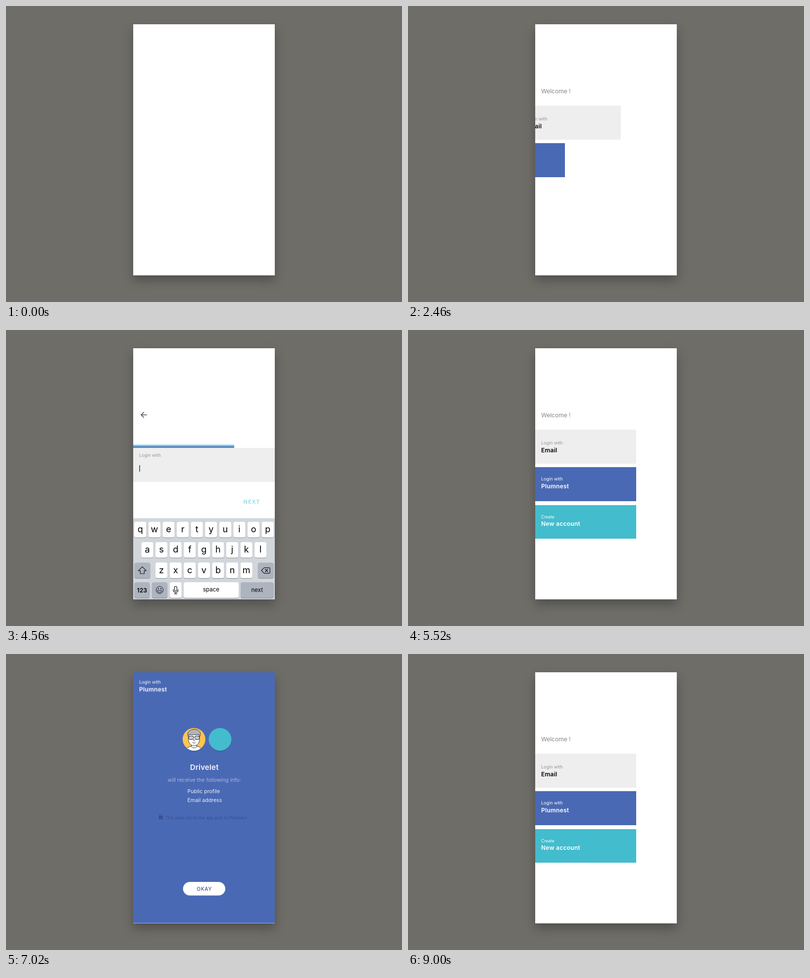
An HTML page that plays this animation: 800x600 px, repeating every 9.03 s.

```html
<!DOCTYPE html>
<html lang="en">
<head>
<meta charset="utf-8">
<title>Login flow</title>
<style>
  html, body { margin: 0; width: 100%; height: 100%; overflow: hidden; background: #6e6d68; }
  body { position: relative; font-family: Inter, Roboto, sans-serif; }

  .phone {
    position: absolute; left: 257px; top: 37px; width: 286px; height: 509px;
    background: #fff; box-shadow: 0 10px 20px rgba(0, 0, 0, .28);
  }
  .screen, .layer { position: absolute; left: 0; top: 0; width: 286px; height: 509px; overflow: hidden; }
  .layer { z-index: 6; }
  svg text { font-family: Inter, Roboto, sans-serif; }

  .anim, .card, .card div, .card b, .card span {
    animation: 9030ms cubic-bezier(.4, 0, .2, 1) infinite both;
  }

  .card { position: absolute; left: 0; width: 204px; height: 68.6px; overflow: hidden; color: #fff; }
  .card div { position: absolute; left: 12px; top: 0; white-space: nowrap; }
  .card span, .card b { position: absolute; left: 0; line-height: 16px; }
  .card span { top: 16.2px; font-size: 9px; }
  .card b { top: 31.2px; font-size: 12px; font-weight: 600; letter-spacing: .25px; }

  .email { top: 165px; background: #eee; color: #000; animation-name: email, widen; z-index: 3; }
  .email span { top: 18.5px; color: #969696; animation-name: labelUp; }
  .email b { top: 33.5px; animation-name: nameOut; }
  .social { top: 241.3px; background: #4a69b5; animation-name: social; }
  .social div { animation-name: socialText; }
  .create { top: 317.6px; background: #43bccd; animation-name: create; z-index: 1; }
  .create span { font-size: 8.5px; }
  .create b { top: 30.6px; }
  .caret {
    position: absolute; left: 12px; top: 35px; width: 1.6px; height: 13px;
    background: #3f6cc0; animation-name: caret;
  }

  .logo { transform-box: fill-box; transform-origin: center; animation-name: logo; }
  .ripple { transform-box: fill-box; transform-origin: center; animation-name: ripple; }
  .welcome { animation-name: welcome; }
  .back { animation-name: back; }
  .next { animation-name: next; }
  .keys { animation-name: keys; }
  .page { animation-name: page; }
  .rise { animation-name: rise; animation-delay: var(--d, 0ms); }

  @keyframes logo {
    0%, 5.98% { transform: scale(0); animation-timing-function: cubic-bezier(.2, 0, 0, 1); }
    13.953%, 16.611% { transform: scale(1); }
    20.93%, 100% { transform: scale(0); }
  }
  @keyframes welcome {
    0%, 24.585% { opacity: 0; }
    26.578%, 37.98% { opacity: 1; }
    39.867%, 54.26% { opacity: 0; }
    57.586%, 61.57% { opacity: 1; }
    63.68%, 91.36% { opacity: 0; }
    94.13%, 100% { opacity: 1; }
  }
  @keyframes email {
    0%, 24.585% { transform: translate(-205px, 0); animation-timing-function: cubic-bezier(.15, 0, 0, 1); }
    30.532%, 36.955% { transform: translate(0, 0); }
    41.384%, 53.156% { transform: translate(0, 37px); }
    57.586%, 61.24% { transform: translate(0, 0); }
    65.67%, 90.033% { transform: translate(0, 76.3px); }
    95.238%, 100% { transform: translate(0, 0); }
  }
  @keyframes widen {
    0%, 39.867% { width: 204px; }
    44.297%, 51.495% { width: 286px; }
    55.925%, 100% { width: 204px; }
  }
  @keyframes labelUp {
    0%, 39.867% { transform: translateY(0); }
    44.297%, 51.495% { transform: translateY(-12.4px); }
    55.925%, 100% { transform: translateY(0); }
  }
  @keyframes nameOut {
    0%, 39.867% { opacity: 1; }
    42.303%, 53.156% { opacity: 0; }
    56.5%, 100% { opacity: 1; }
  }
  @keyframes caret {
    0%, 46.844% { opacity: 0; }
    48.173%, 50.498% { opacity: 1; }
    51.495%, 100% { opacity: 0; }
  }
  @keyframes social {
    0%, 26.578% {
      transform: translate(-205px, 0); width: 204px; height: 68.6px; opacity: 1; z-index: 2;
      animation-timing-function: cubic-bezier(.15, 0, 0, 1);
    }
    32.525%, 37.874% { transform: translate(0, 0); width: 204px; height: 68.6px; opacity: 1; z-index: 2; }
    42.303% { transform: translate(0, -42.8px); opacity: 1; z-index: 2; }
    44.297%, 51.495% { transform: translate(0, -42.8px); opacity: .7; z-index: 2; }
    53.156% { transform: translate(0, -42.8px); opacity: 1; z-index: 2; }
    57.586% { transform: translate(0, 0); z-index: 2; }
    61.24%, 64.23% { transform: translate(0, 0); width: 204px; height: 68.6px; z-index: 5; }
    70.764%, 83.056% { transform: translate(0, -241.3px); width: 286px; height: 509px; z-index: 5; }
    90.033%, 95.238% { transform: translate(0, 0); width: 204px; height: 68.6px; z-index: 5; }
    100% { transform: translate(0, 0); width: 204px; height: 68.6px; opacity: 1; z-index: 2; }
  }
  @keyframes socialText {
    0%, 64.23% { transform: translateY(0); }
    70.764%, 83.056% { transform: translateY(-3.7px); }
    90.033%, 100% { transform: translateY(0); }
  }
  @keyframes create {
    0%, 28.571% {
      transform: translate(-205px, 0); opacity: 1;
      animation-timing-function: cubic-bezier(.15, 0, 0, 1);
    }
    34.518%, 36.877% { transform: translate(0, 0); opacity: 1; }
    41.307% { transform: translate(0, -122.6px); opacity: 1; }
    44.297%, 51.495% { transform: translate(0, -122.6px); opacity: .65; }
    53.156% { transform: translate(0, -122.6px); opacity: 1; }
    58.7%, 61.24% { transform: translate(0, 0); opacity: 1; }
    65.67%, 90.033% { transform: translate(0, -76.3px); }
    95.238%, 100% { transform: translate(0, 0); opacity: 1; }
  }
  @keyframes back {
    0%, 39.867% { opacity: 0; }
    42.303%, 52.049% { opacity: 1; }
    53.71%, 100% { opacity: 0; }
  }
  @keyframes ripple {
    0%, 50.498% { opacity: 0; transform: scale(.3); }
    51.6% { opacity: .12; transform: scale(1); }
    54.2%, 100% { opacity: 0; transform: scale(1); }
  }
  @keyframes next {
    0%, 43.2% { opacity: 0; }
    46.844%, 51.495% { opacity: .52; }
    53.156%, 100% { opacity: 0; }
  }
  @keyframes keys {
    0%, 41.528% { transform: translateY(166px); }
    46.844%, 51.495% { transform: translateY(0); }
    55.925%, 100% { transform: translateY(166px); }
  }
  @keyframes page {
    0%, 60% { opacity: 0; }
    65%, 81.728% { opacity: 1; }
    83.7%, 100% { opacity: 0; }
  }
  @keyframes rise {
    0%, 71.096% { opacity: 0; }
    74.4%, 100% { opacity: 1; }
  }
</style>
</head>
<body>
<div class="phone">
  <div class="screen">
    <div class="card create"><div><span>Create</span><b>New account</b></div></div>
    <div class="card social"><div><span>Login with</span><b>Plumnest</b></div></div>
    <div class="card email">
      <div><span>Login with</span><b>Email</b></div>
      <i class="caret anim"></i>
    </div>

    <!-- drawn in stage coordinates -->
    <svg class="layer" viewBox="257 37 286 509">
      <circle class="logo anim" cx="400.3" cy="272" r="23.2" fill="#43bccd"/>
      <text class="welcome anim" x="269" y="176.8" font-size="12" fill="#868686">Welcome !</text>
      <circle class="ripple anim" cx="278.5" cy="172" r="16"/>
      <path class="back anim" d="M284.8 172H273.2M278.6 166.4L273 172l5.6 5.6" fill="none" stroke="#555" stroke-width="1.5"/>
      <text class="next anim" x="479.5" y="351.5" font-size="11" font-weight="700" letter-spacing="1" fill="#43bccd">NEXT</text>

      <g class="page anim">
        <g class="rise anim">
          <clipPath id="face"><circle cx="379.8" cy="173" r="23"/></clipPath>
          <g fill="#34487e" opacity=".35">
            <circle cx="379.8" cy="174.6" r="23.2"/><circle cx="432.4" cy="174.6" r="23.2"/>
          </g>
          <circle cx="379.8" cy="173" r="23" fill="#fdc551"/>
          <g clip-path="url(#face)" stroke="#3c3c44" stroke-width="1" fill="#fff">
            <path d="M363 198c1-8 6-10 12-11.500h9.600c6 1.500 11 3.500 12 11.500z"/>
            <path d="M374.500 183v5q5.300 5 10.600 0v-5z"/>
            <path d="M368.500 163v10c0 7.500 5 13 11.300 13s11.300-5.500 11.300-13v-10z"/>
            <path d="M368.300 168c-2.500-6-.5-11 3-12 2-4 15-5 18 0 4 1.500 4.500 7 2 12l-1.500-5c-6 1-14 1-20 0z" fill="#b4b4b6"/>
            <rect x="370" y="166.500" width="8" height="6.500" rx="1.800" stroke-width="1.300"/>
            <rect x="382" y="166.500" width="8" height="6.500" rx="1.800" stroke-width="1.300"/>
            <path d="M378 168.500h4M376.500 179.500q3.300 2 6.600 0M379.500 172v4h1.500" fill="none"/>
            <g stroke="none" fill="#3c3c44"><circle cx="374" cy="169.700" r="1"/><circle cx="386" cy="169.700" r="1"/></g>
          </g>
          <circle cx="432.4" cy="173" r="23" fill="#43bccd"/>
        </g>
        <text class="rise anim" style="--d:60ms" x="400.700" y="234.800" text-anchor="middle" font-size="15" font-weight="600" letter-spacing=".2" fill="#f3f5fa">Drivelet</text>
        <text class="rise anim" style="--d:120ms" x="400.500" y="259.300" text-anchor="middle" font-size="10.600" fill="#a9b7da">will receive the following info:</text>
        <g class="rise anim" style="--d:180ms" font-size="10.600" fill="#eef1f8">
          <text x="366.500" y="282.300">Public profile</text>
          <text x="366.500" y="300.300">Email address</text>
        </g>
        <g class="rise anim" style="--d:240ms" fill="#364f90">
          <rect x="308.700" y="328.300" width="8" height="7" rx="1"/>
          <path d="M310.500 329v-2a2.200 2.200 0 0 1 4.400 0v2" fill="none" stroke="#364f90" stroke-width="1.100"/>
          <circle cx="312.700" cy="331.800" r=".9" fill="#4a69b5"/>
          <text x="321.700" y="334.600" font-size="8.300">This does not let the app post to Plumnest.</text>
        </g>
        <g class="rise anim" style="--d:270ms">
          <rect x="357.600" y="462" width="85.400" height="27.600" rx="13.800" fill="#fff"/>
          <text x="400.700" y="479.700" text-anchor="middle" font-size="10" font-weight="500" letter-spacing=".8" fill="#3d5599">OKAY</text>
        </g>
        <text class="rise anim" style="--d:570ms" x="400.300" y="531.300" text-anchor="middle" font-size="9" letter-spacing=".6" fill="#fff" fill-opacity=".6">CANCEL</text>
      </g>

      <g class="keys anim" id="keys">
        <rect x="257" y="381.500" width="286" height="165" fill="#d1d6db"/>
      </g>
    </svg>
  </div>
</div>

<script>
  const board = document.getElementById('keys');

  function add(tag, attrs, text) {
    const el = document.createElementNS('http://www.w3.org/2000/svg', tag);
    for (const k in attrs) el.setAttribute(k, attrs[k]);
    if (text) el.textContent = text;
    board.append(el);
  }

  function key(x, y, w, label, size, dark, weight = 400, lift = 0) {
    const box = { x, width: w, height: 31.6, rx: 4 };
    add('rect', { ...box, y: y + 1, fill: '#8b8f96' });
    add('rect', { ...box, y, fill: dark ? '#adb4bf' : '#fff' });
    if (label) add('text', {
      x: x + w / 2, y: y + 15.8 + size * .364 - lift,
      'text-anchor': 'middle', 'font-size': size, 'font-weight': weight
    }, label);
  }

  function icon(d, width = 1.2) {
    add('path', { d, fill: 'none', stroke: '#16181c', 'stroke-width': width, 'stroke-linejoin': 'round', 'stroke-linecap': 'round' });
  }

  const rows = [['qwertyuiop', 259.1, 388.8], ['asdfghjkl', 273.3, 430], ['zxcvbnm', 301.9, 471.3]];
  for (const [letters, left, top] of rows) {
    [...letters].forEach((c, i) => key(left + i * 28.6, top, 24.3, c, 18, false, 400, 1));
  }

  key(259.3, 471.5, 32, '', 0, true);
  icon('M275.300 479.800l-8 8h4v6.200h8v-6.200h4z');
  key(508.800, 471.5, 32, '', 0, true);
  icon('M521.500 481.800h10.200q1.500 0 1.500 1.500v8.400q0 1.500-1.500 1.500h-10.200l-5.500-5.700zM523.800 485l5 5M528.800 485l-5 5');

  key(259.3, 511.3, 31, '123', 12.2, true, 600);
  key(294.8, 511.3, 31.3, '', 0, true);
  add('circle', { cx: 310.4, cy: 527, r: 7.2, fill: 'none', stroke: '#16181c' });
  add('circle', { cx: 307.8, cy: 524.7, r: 1.1 });
  add('circle', { cx: 313, cy: 524.7, r: 1.1 });
  icon('M305.800 528.300h9.200q-.8 4-4.600 4t-4.600-4z', .9);
  key(330.8, 511.3, 24, '', 0, false);
  add('rect', { x: 340.4, y: 519.5, width: 4.8, height: 10, rx: 2.4, fill: '#fff', stroke: '#16181c', 'stroke-width': 1.2 });
  icon('M338 526v1.500a4.800 4.800 0 0 0 9.600 0v-1.500M342.800 532.300v2.500M340 535h5.600');
  key(359, 511.3, 111, 'space', 11.5, false, 400, 1);
  key(474, 511.3, 66.700, 'next', 11.5, true);
</script>
</body>
</html>
```
